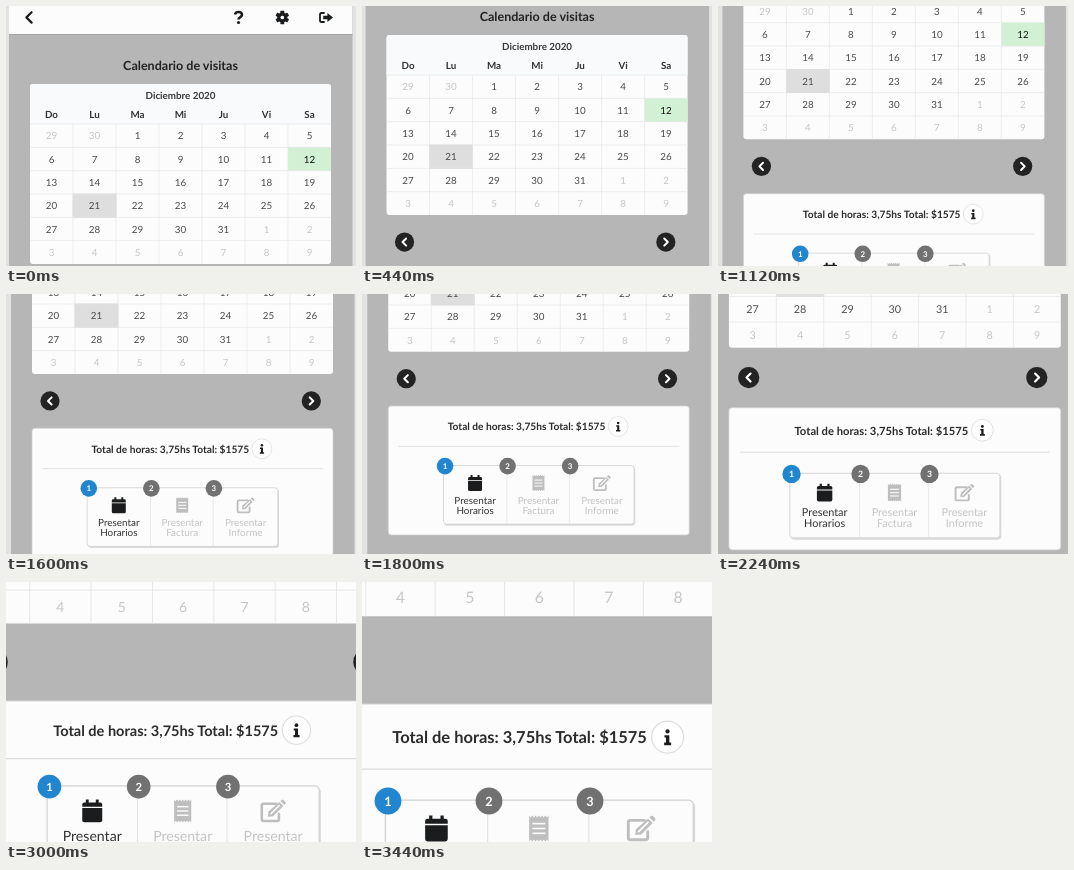
An HTML page that plays this animation: 350x260 px, repeating every 3680 ms.

```html
<!DOCTYPE html>
<html lang="es">
<head>
<meta charset="utf-8">
<title>Calendario de visitas</title>
<style>
html, body { margin: 0; width: 100%; height: 100%; overflow: hidden; background: #e2e2e2; }
svg { display: block; width: 350px; height: 260px; }
text { font-family: Lato, sans-serif; text-anchor: middle; text-rendering: geometricPrecision; }
</style>
</head>
<body>
<svg viewBox="0 0 350 260"><g id="page"></g></svg>
<script>
const INK = '#2b2b2b', PALE = '#c6c6c6', ICON = '#1b1c1d', PAPER = '#fcfcfc';
const LEFT = 24, WIDTH = 301, COL = WIDTH / 7, TOP = 118, ROW = 23.33;
const parts = [];

const add = s => parts.push(s);
const rect = (x, y, w, h, fill, more = '') =>
  add(`<rect x="${x}" y="${y}" width="${w}" height="${h}" fill="${fill}" ${more}/>`);
const circle = (x, y, r, fill, more = '') =>
  add(`<circle cx="${x}" cy="${y}" r="${r}" fill="${fill}" ${more}/>`);
const text = (s, x, y, size, fill = INK, weight = 400) =>
  add(`<text x="${x}" y="${y}" font-size="${size}" fill="${fill}" font-weight="${weight}">${s}</text>`);
const line = (d, color, w, more = '') =>
  add(`<path d="${d}" fill="none" stroke="${color}" stroke-width="${w}" ${more}/>`);
const shape = (d, fill) => add(`<path d="${d}" fill="${fill}" fill-rule="evenodd"/>`);
const group = (x, y, draw) => {
  add(`<g transform="translate(${x} ${y})">`);
  draw();
  add('</g>');
};
const ROUND = 'stroke-linecap="round" stroke-linejoin="round"';

function toolbar() {
  rect(3, 0, 343.5, 29, '#a4a4a4');
  rect(3, 0, 343.5, 28, PAPER);
  line('M25.6 6.2L20.4 11.4L25.6 16.6', ICON, 2.2, ROUND);
  group(232.5, 11.5, () => {
    line('M-3.5 -3C-2.6 -6.4 3.7 -6.2 3.5 -2.6C3.4 -.2 0 -.3 0 2', ICON, 2.6);
    circle(0, 5, 1.6, ICON);
  });
  group(276.3, 11.5, () => {
    for (let a = 0; a < 360; a += 60)
      rect(-1.9, -6.8, 3.8, 5, ICON, `rx=".6" transform="rotate(${a})"`);
    circle(0, 0, 3.7, 'none', `stroke="${ICON}" stroke-width="2.8"`);
  });
  group(320, 11.5, () => {
    line('M-2 -4.5H-4.6Q-6 -4.5 -6 -3V3Q-6 4.5 -4.6 4.5H-2', ICON, 1.8, ROUND);
    shape('M-2.8 -1.8H1.4V-4.6L7 0L1.4 4.6V1.8H-2.8Z', ICON);
  });
}

function calendar() {
  text('Calendario de visitas', 174.5, 64.2, 12.55, '#222', 700);
  rect(LEFT, 78, WIDTH, 180, PAPER, 'rx="3"');
  shape('M24 118V81Q24 78 27 78H322Q325 78 325 81V118Z', '#f8fafb');
  text('Diciembre 2020', 174.5, 93, 9.8, '#3a3a3a', 700);
  const mid = c => LEFT + COL * (c + .5);
  'Do Lu Ma Mi Ju Vi Sa'.split(' ').forEach((d, c) => text(d, mid(c), 112.3, 9.8, '#333', 700));

  rect(LEFT + COL * 6, TOP + ROW, COL, ROW, '#d2f0d4');
  rect(LEFT + COL, TOP + ROW * 3, COL, ROW, '#dedede', 'stroke="#cfcfcf" stroke-width=".7"');
  for (let r = 0; r < 6; r++)
    line(`M${LEFT} ${TOP + ROW * r}h${WIDTH}`, '#e6e7e7', .7);
  for (let c = 1; c < 7; c++)
    line(`M${LEFT + COL * c} ${TOP}v${ROW * 6}`, '#e6e7e7', .7);

  for (let i = 0; i < 42; i++) {
    const n = i - 1, inMonth = n > 0 && n < 32;
    const day = inMonth ? n : n < 1 ? n + 30 : n - 31;
    const fill = !inMonth ? PALE : n === 12 ? '#111' : '#4a4a4a';
    text(day, mid(i % 7), TOP + ROW * (Math.floor(i / 7) + .5) + 3.6, 9.8, fill);
  }
}

function arrows() {
  for (const [x, s] of [[42, 1], [303.3, -1]]) {
    circle(x, 285, 9.6, '#232323');
    line(`M${x + 1.6 * s} 281.4L${x - 2 * s} 285L${x + 1.6 * s} 288.6`, '#fff', 2, ROUND);
  }
}

function calendarIcon() {
  shape('M-7 -2.9V-4.6Q-7 -6 -5.5 -6H-4.5V-8H-2.5V-6H2.5V-8H4.5V-6H5.5Q7 -6 7 -4.6V-2.9Z', ICON);
  shape('M-7 -2H7V6.5Q7 8 5.5 8H-5.5Q-7 8 -7 6.5Z', ICON);
}

function receiptIcon() {
  let d = 'M-6 -8';
  for (let i = 0; i < 6; i++) d += `l1 ${i % 2 ? -1.2 : 1.2}l1 ${i % 2 ? 1.2 : -1.2}`.replace(/-?1\.2/g, (v, at) => at < 5 ? '1.2' : '-1.2');
  d += 'V8';
  for (let i = 0; i < 6; i++) d += 'l-1 -1.2l-1 1.2';
  shape(d + 'Z', '#bebebe');
  for (const y of [-3, 0, 3]) line(`M-4 ${y}H4`, PAPER, 1);
}

function editIcon() {
  line('M2 -5H-6.8Q-8 -5 -8 -3.8V5.8Q-8 7 -6.8 7H2.8Q4 7 4 5.8V2', '#bebebe', 1.8, ROUND);
  shape('M4.3 -6.2L7.1 -3.4L0 3.7L-3.7 4.1L-3.3 .4ZM5 -6.9L6 -7.7Q6.6 -8.2 7.2 -7.7L8.6 -6.3Q9.1 -5.7 8.6 -5.1L7.8 -4.1Z', '#bebebe');
  line('M-1.9 2.3L4.5 -4.1', PAPER, 1.1);
}

function card() {
  rect(LEFT, 312.3, WIDTH, 129, PAPER, 'rx="3" stroke="#d0d0d1" stroke-width=".7"');
  text('Total de horas: 3,75hs Total: $1575', 162.3, 336.7, 10.2, INK, 700);
  circle(253.9, 332.8, 9.9, '#fff', 'stroke="#dedede" stroke-width=".8"');
  circle(253.9, 329.3, 1.3, ICON);
  shape('M252 331.6H255V336.2H256.1V337.8H251.8V336.2H252.9V333.1H252Z', ICON);
  line('M34 352.7H315', '#dcdcdd', .8);

  rect(80, 373, 191, 59, '#dadada', 'rx="3"');
  rect(79.2, 371.8, 190.6, 58.6, PAPER, 'rx="3" stroke="#d2d2d3" stroke-width=".8"');
  const steps = [['Horarios', calendarIcon], ['Factura', receiptIcon], ['Informe', editIcon]];
  steps.forEach(([name, icon], i) => {
    const x = 110.8 + 63.4 * i, edge = 80.8 + 62.55 * i;
    const fill = i ? '#c4c4c4' : '#333';
    if (i) line(`M${79.8 + 62.7 * i} 372.2v57.8`, '#e2e2e2', .7);
    group(x, 389.4, icon);
    text('Presentar', x, 410.4, 9.9, fill);
    text(name, x, 420.4, 9.9, fill);
    circle(edge, 372.4, 8.3, i ? '#717171' : '#2185d0');
    text(i + 1, edge, 375.2, 7.9, '#fff', 700);
  });
}

rect(3, 0, 343.5, 520, '#b6b6b6');
toolbar();
calendar();
arrows();
card();
const page = document.getElementById('page');
page.innerHTML = parts.join('');

// Scroll down for 1.8 s, rest, then zoom in; 40 ms steps.
const LOOP = 3680, TICK = 40;
const mix = (a, b, k) => a + (b - a) * k;
const ramp = (t, from, to) => Math.min(1, Math.max(0, (t - from) / (to - from)));

function render(now) {
  const t = Math.floor(now % LOOP / TICK) * TICK;
  const scroll = ramp(t, 0, 1800), zoom = ramp(t, 2000, 3440);
  const x = mix(2.25 * scroll, -104.5, zoom);
  const y = mix(-200.3 * scroll, -382.4, zoom);
  page.setAttribute('transform', `translate(${x} ${y}) scale(${mix(1, 1.615, zoom)})`);
}

const start = performance.now();
function frame() {
  render(performance.now() - start);
  requestAnimationFrame(frame);
}
render(0);
requestAnimationFrame(frame);
</script>
</body>
</html>
```
